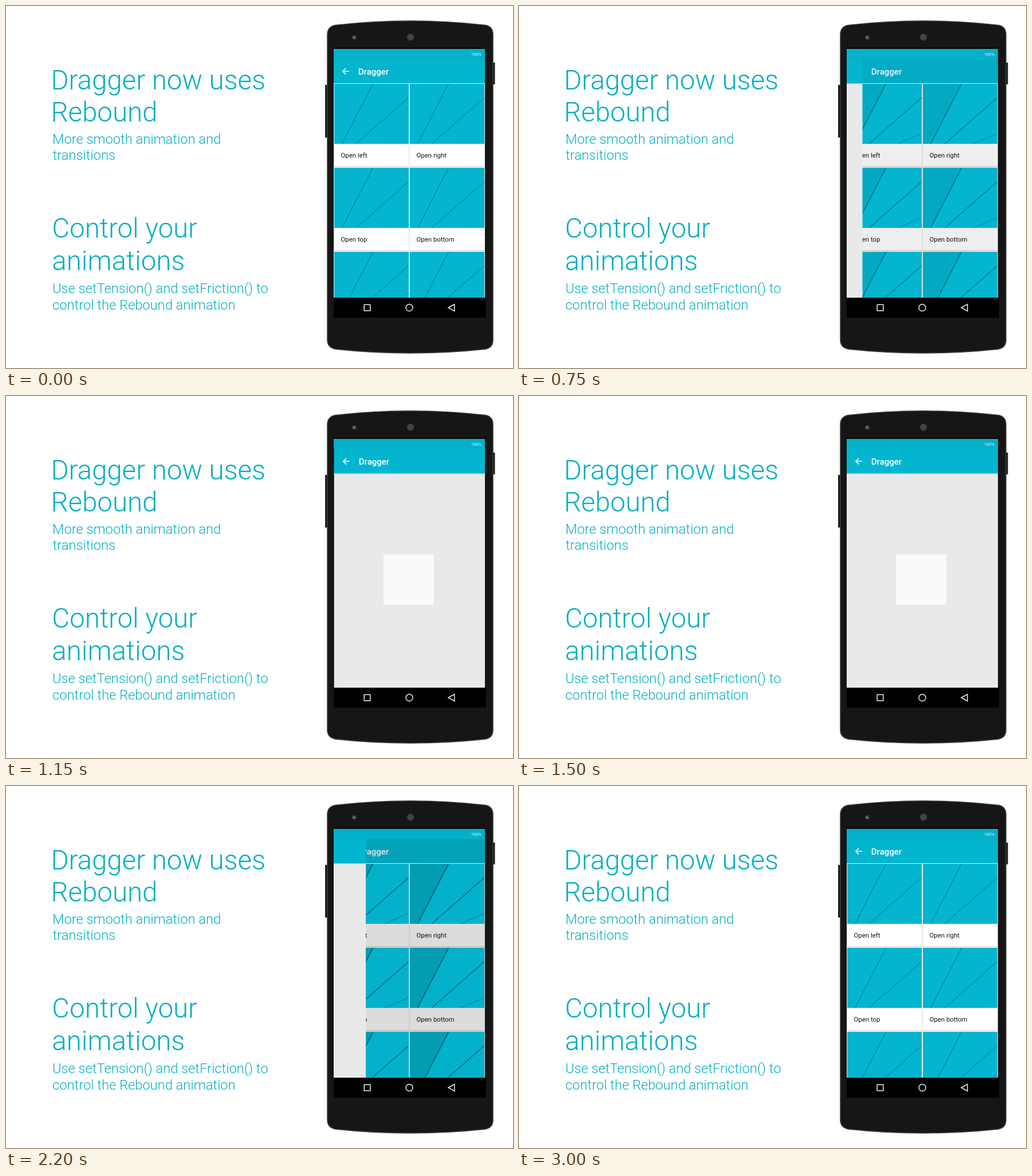
Write an HTML page with a canvas that moves like this. It is 885 by 633 pixels and loops after 3.05 s.

```html
<!DOCTYPE html>
<html lang="en">
<head>
<meta charset="utf-8">
<title>Dragger now uses Rebound</title>
<style>
  html, body { margin: 0; width: 100%; height: 100%; overflow: hidden; background: #fff; }
  canvas { display: block; }
</style>
</head>
<body>
<canvas id="stage" width="885" height="633"></canvas>
<script>
const ctx = document.getElementById('stage').getContext('2d');
const LOOP = 3050, STEP = 50;
const OPEN_AT = 719, CLOSE_AT = 2067;
const CYAN = '#03b5cf', STATUS = '#05b0c9', INK = '#04aec2', PAPER = '#e9e9e9';
const TITLE = 47.4, BODY = 23.7;
const SCREEN = { x: 572, y: 75, w: 264, bar: 93, body: 135, bottom: 510 };

function rect(x, y, w, h, color) {
  ctx.fillStyle = color;
  ctx.fillRect(x, y, w, h);
}

function text(str, x, y, size, weight, color) {
  ctx.font = `${weight} ${size}px Roboto, sans-serif`;
  ctx.fillStyle = color;
  ctx.fillText(str, x, y);
}

function trace(points) {
  ctx.beginPath();
  points.forEach(([x, y]) => ctx.lineTo(x, y));
}

function poly(points, fill) {
  trace(points);
  ctx.fillStyle = fill;
  ctx.fill();
}

function line(points, color, width) {
  trace(points);
  ctx.strokeStyle = color;
  ctx.lineWidth = width;
  ctx.stroke();
}

function disc(x, y, r, color) {
  ctx.beginPath();
  ctx.arc(x, y, r, 0, Math.PI * 2);
  ctx.fillStyle = color;
  ctx.fill();
}

function clipTo(x, y, w, h, draw) {
  ctx.save();
  ctx.beginPath();
  ctx.rect(x, y, w, h);
  ctx.clip();
  draw();
  ctx.restore();
}

// Underdamped spring from 0 to 1, t in seconds
function spring(t, tension = 280, friction = 24) {
  if (t <= 0) return 0;
  const decay = friction / 2;
  const freq = Math.sqrt(tension - decay * decay);
  return 1 - Math.exp(-decay * t) * (Math.cos(freq * t) + decay / freq * Math.sin(freq * t));
}

function panelProgress(ms) {
  return ms < CLOSE_AT ? spring((ms - OPEN_AT) / 1000) : 1 - spring((ms - CLOSE_AT) / 1000);
}

function drawCopy() {
  text('Dragger now uses', 78.5, 146, TITLE, 300, INK);
  text('Rebound', 78.5, 202, TITLE, 300, INK);
  text('More smooth animation and', 81, 241, BODY, 300, INK);
  text('transitions', 81.5, 269, BODY, 300, INK);
  text('Control your', 80.3, 405, TITLE, 300, INK);
  text('animations', 80.3, 462, TITLE, 300, INK);
  text('Use setTension() and setFriction() to', 81, 502, BODY, 300, INK);
  text('control the Rebound animation', 81, 530.5, BODY, 300, INK);
}

function drawPhone() {
  rect(557, 138, 5, 92, '#1c1c1c');
  rect(849, 99, 4.5, 38, '#1c1c1c');

  ctx.beginPath();
  ctx.moveTo(561, 50);
  ctx.quadraticCurveTo(561, 36, 575, 33.5);
  ctx.quadraticCurveTo(640, 26, 706, 26);
  ctx.quadraticCurveTo(772, 26, 837, 33.5);
  ctx.quadraticCurveTo(850, 36, 850, 50);
  ctx.lineTo(850, 584);
  ctx.quadraticCurveTo(850, 597, 837, 600);
  ctx.quadraticCurveTo(772, 607, 706, 607);
  ctx.quadraticCurveTo(640, 607, 575, 600);
  ctx.quadraticCurveTo(561, 597, 561, 584);
  ctx.closePath();
  ctx.fillStyle = '#161616';
  ctx.fill();
  ctx.strokeStyle = '#3b3d3d';
  ctx.lineWidth = 1.6;
  ctx.stroke();

  disc(608, 55, 4, '#3a3a3a');
  disc(607.5, 55, 2, '#777');
  disc(706, 54.5, 6.5, '#333');
  for (let y = -4; y <= 4; y += 2)
    for (let x = -4; x <= 4; x += 2)
      if (x * x + y * y < 30) rect(705.5 + x, 54 + y, 1, 1, '#747474');
  rect(797, 53, 2, 1, '#222');
  rect(571, 73, 266, 2, '#050505');

  rect(572, 510, 266, 35, '#000');
  ctx.strokeStyle = '#eee';
  ctx.lineWidth = 1.5;
  ctx.strokeRect(625.2, 522.2, 10.6, 10.6);
  ctx.beginPath();
  ctx.arc(704, 527.5, 6, 0, Math.PI * 2);
  ctx.stroke();
  trace([[772, 527.5], [782.8, 521.5], [782.8, 533.5]]);
  ctx.closePath();
  ctx.stroke();
}

function drawHeader() {
  const { x, w, bar, body } = SCREEN;
  rect(x, bar, w, body - bar, CYAN);
  line([[599, 114.2], [587.8, 114.2]], '#fff', 1.5);
  line([[593.2, 108.8], [587.8, 114.2], [593.2, 119.6]], '#fff', 1.5);
  text('Dragger', 614.8, 119.7, 15, 500, '#fff');
}

function drawTile(x, y, dim) {
  const w = 130, h = 105;
  const ridge = 1 + Math.min(dim * 6, 0.8);
  clipTo(x, y, w, h, () => {
    rect(x, y, w, h, CYAN);
    poly([[x, y], [x + 67.5, y], [x + 13.5, y + h], [x, y + h]], `rgba(0,0,0,${dim})`);
    poly([[x + 67.5, y], [x + w, y], [x + w, y + h], [x + 13.5, y + h]],
      `rgba(0,0,0,${Math.max(0, dim - 0.12)})`);
    line([[x + 67.5, y], [x + 13.5, y + h]], 'rgba(0,55,66,.55)', ridge);
    line([[x + w, y + 24], [x + 38, y + h]], 'rgba(0,60,72,.5)', ridge);
    line([[x + w, y + 87], [x + 88, y + h]], `rgba(0,60,72,${0.06 + Math.min(dim * 5, 0.4)})`, 1);
  });
}

function drawList(dim) {
  const { x, w, bar, body, bottom } = SCREEN;
  const labels = ['Open left', 'Open right', 'Open top', 'Open bottom'];
  drawHeader();
  rect(x, bar, w, body - bar, `rgba(0,0,0,${dim * 0.75})`);
  rect(x, body, w, bottom - body, '#ececec');
  labels.forEach((label, i) => {
    const left = 573 + (i % 2) * 132, top = 241 + (i >> 1) * 147;
    rect(left, top, 130, 39, '#fff');
    rect(left, top + 39, 130, 1, '#d9d9d9');
    text(label, left + 11.5, top + 24.2, 11.4, 400, '#111');
  });
  rect(x, body, w, bottom - body, `rgba(0,0,0,${dim})`);
  for (let i = 0; i < 6; i++)
    drawTile(573 + (i % 2) * 132, 136 + (i >> 1) * 147, dim);
  rect(x, body, w, 1, 'rgba(215,238,241,.8)');
}

function drawPanel(offset) {
  const { x, w, bar, body, bottom } = SCREEN;
  ctx.save();
  ctx.translate(offset, 0);
  rect(x, body, w, bottom - body, PAPER);
  drawHeader();
  rect(x, body, w, 1, 'rgba(0,0,0,.22)');
  rect(x, body + 1, w, 1, 'rgba(0,0,0,.08)');
  rect(658, 277, 88, 88, '#fafafa');
  ctx.restore();
}

function drawScreen(ms) {
  const { x, y, w, bar, bottom } = SCREEN;
  const progress = panelProgress(ms);
  const dim = 0.65 * Math.min(1, Math.max(0, progress));
  clipTo(x, y, w, bottom - y, () => {
    drawList(dim);
    if (progress > 0) drawPanel((progress - 1) * w);
    rect(x, y, w, bar - y, STATUS);
    text('100%', 811.8, 87.3, 7.5, 400, '#e8fafc');
  });
}

let start;
function frame(now) {
  start ??= now;
  const ms = Math.floor(((now - start) % LOOP) / STEP) * STEP;
  rect(0, 0, 885, 633, '#fff');
  drawCopy();
  drawPhone();
  drawScreen(ms);
  requestAnimationFrame(frame);
}
requestAnimationFrame(frame);
</script>
</body>
</html>
```
